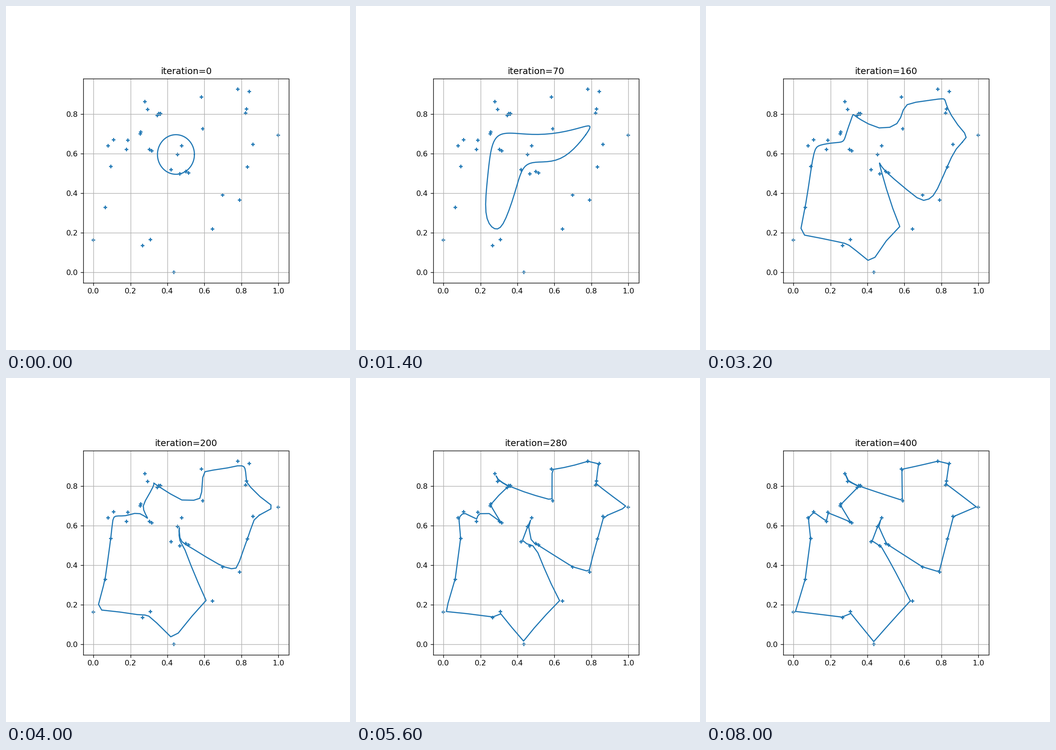
These frames come from a looping animation (748x748 px, 8.2 s). A matplotlib script:

```python
"""Elastic net solving the dj38 travelling salesman problem."""
import numpy as np
import matplotlib.pyplot as plt
from matplotlib.animation import FuncAnimation

STAGE = 748
INCHES = 6.4
FRAMES, INTERVAL, STRIDE = 41, 200, 10

ALPHA, BETA = 0.2, 2.0
K_START, K_DECAY, K_MIN = 0.2, 0.99, 0.01
RADIUS, NODES_PER_CITY = 0.1, 2.5

# dj38, in thousandths of its width
CITY_X = [0, 64, 79, 93, 110, 179, 187, 252, 256, 265, 279, 294, 304,
          309, 316, 345, 353, 360, 363, 419, 434, 455, 467, 476, 499, 514,
          585, 591, 643, 698, 782, 790, 824, 828, 834, 843, 864, 1000]
CITY_Y = [162, 328, 640, 534, 669, 620, 666, 699, 709, 135, 863, 823, 621,
          165, 613, 792, 801, 799, 801, 518, 0, 596, 497, 639, 510, 502,
          886, 725, 219, 391, 926, 364, 804, 824, 533, 913, 646, 693]


def initial_ring(cities):
    count = int(NODES_PER_CITY * len(cities))
    theta = np.linspace(0, 2 * np.pi, count, endpoint=False)
    ring = np.column_stack([np.cos(theta), np.sin(theta)])
    return cities.mean(axis=0) + RADIUS * ring


def step(net, cities, k):
    """Pull the nodes towards the cities and keep the ring short."""
    gap = cities[:, None, :] - net[None, :, :]
    dist2 = (gap ** 2).sum(axis=2)
    dist2 -= dist2.min(axis=1, keepdims=True)
    weight = np.exp(-dist2 / (2 * k) ** 2)
    weight /= weight.sum(axis=1, keepdims=True)
    pull = (weight[:, :, None] * gap).sum(axis=0)
    tension = np.roll(net, -1, axis=0) - 2 * net + np.roll(net, 1, axis=0)
    return net + ALPHA * pull + BETA * k * tension


def solve(cities):
    """Return the closed ring at every STRIDE-th iteration."""
    net, k = initial_ring(cities), K_START
    rings = []
    for i in range((FRAMES - 1) * STRIDE + 1):
        if i % STRIDE == 0:
            rings.append(np.vstack([net, net[:1]]))
        k = max(K_MIN, k * K_DECAY)
        net = step(net, cities, k)
    return rings


cities = np.column_stack([CITY_X, CITY_Y]) / 1000
rings = solve(cities)

fig = plt.figure(figsize=(INCHES, INCHES), dpi=STAGE / INCHES, facecolor="white")
ax = fig.add_axes([168 / STAGE, 146 / STAGE, 446.5 / STAGE, 444 / STAGE])
ax.set_xlim(-0.0555, 1.0560)
ax.set_ylim(-0.0530, 0.9784)
ax.set_xticks(np.arange(6) / 5)
ax.set_yticks(np.arange(5) / 5)
ax.grid(True)
ax.scatter(*cities.T, s=20, marker="+", color="C0")
curve, = ax.plot(*rings[0].T, color="C0")
title = ax.set_title("iteration=0")


def draw(frame):
    curve.set_data(*rings[frame].T)
    title.set_text(f"iteration={frame * STRIDE}")
    return curve, title


anim = FuncAnimation(fig, draw, frames=FRAMES, interval=INTERVAL,
                     repeat=True, repeat_delay=0, blit=False)
plt.show()
```
